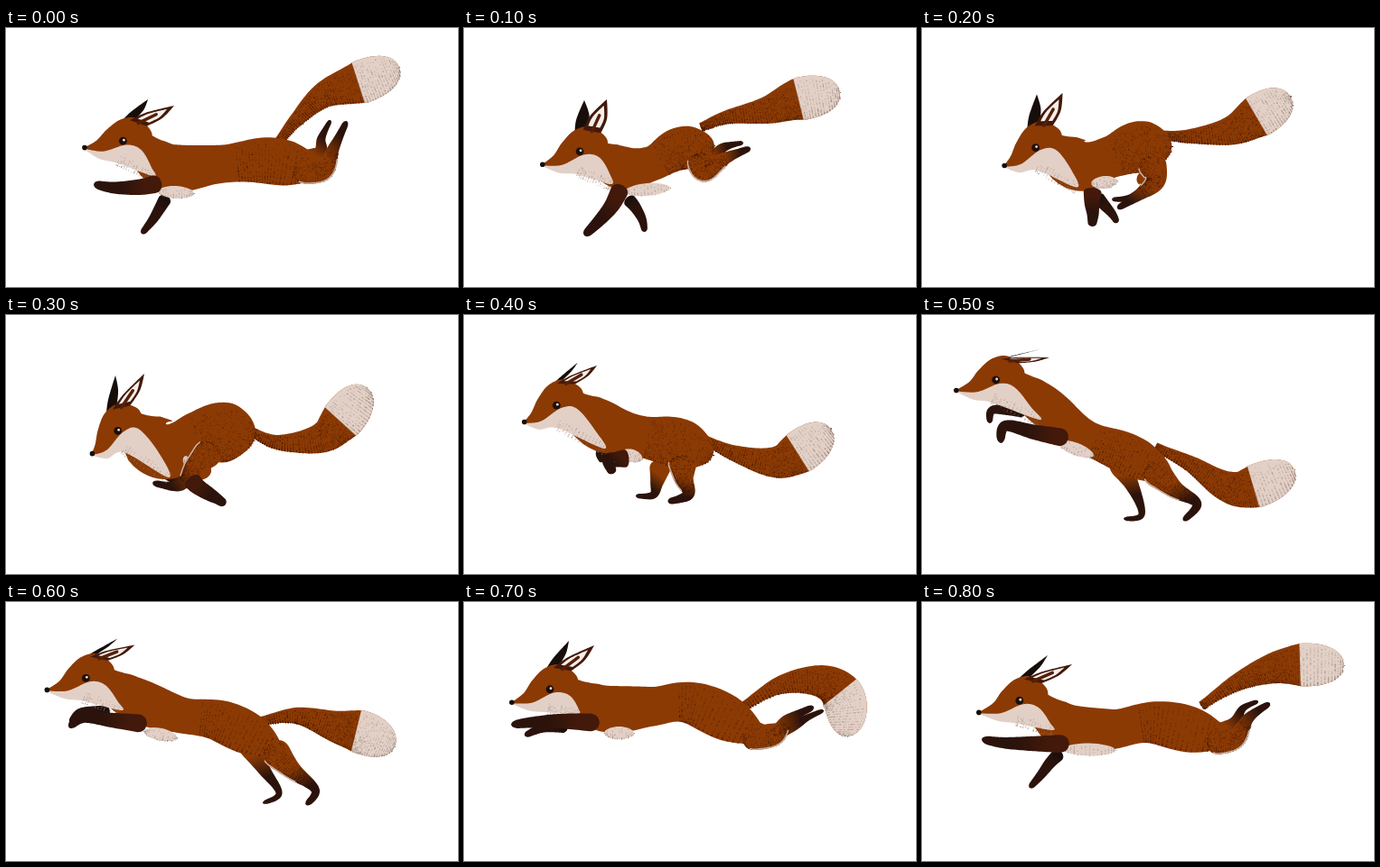
An HTML page with a canvas for the animation above (900 ms loop, 500 by 287 pixels).

```html
<!DOCTYPE html>
<html lang="en">
<head>
<meta charset="utf-8">
<title>Running fox</title>
<style>
html, body { margin: 0; width: 100%; height: 100%; overflow: hidden; background: #fff; }
canvas { display: block; width: 500px; height: 287px; }
</style>
</head>
<body>
<canvas id="stage" width="500" height="287"></canvas>
<script>
const W = 500, H = 287, STEP = 100;
const RUST = '#8b3a04', BROWN = '#42190a', DARK = '#2b130c', BLACK = '#170e0b';
const CREAM = '#e2d0c6', SOOT = '#3a1408', DUST = '#8d7a74';

// A pose is a skeleton of "x,y" joints. head: skull, nose, end of the bib; ears: far and near tip.
const stretched = {
  head: '140,122 85,133 163,164', ears: '157,79 186,86', girth: 25,
  spine: '143,126 180,154 235,151 290,147 350,158', belly: '168,181 208,183',
  tail: '300,128 321,102 352,74 395,59 435,43',
  nearHind: '318,153 350,158 363,132 377,103', farHind: '325,150 347,138 349,122 359,102',
  nearFront: '172,171 150,176 120,177 97,173', farFront: '178,186 170,200 162,213 150,228'
};
const reach = {
  head: '138,132 85,152 162,173', ears: '133,80 158,79', girth: 23,
  spine: '143,138 175,155 208,150 238,134 277,130', belly: '178,181 228,177',
  tail: '262,110 290,99 335,91 370,79 416,71',
  nearHind: '262,138 266,157 290,144 317,133', farHind: '258,142 276,142 288,132 309,127',
  nearFront: '175,174 164,196 150,213 133,230', farFront: '180,188 189,198 197,212 200,226'
};
const gathered = {
  head: '131,120 94,155 180,180', ears: '121,67 153,65', girth: 32,
  spine: '138,126 178,150 212,135 242,130 276,132', belly: '196,164 204,162',
  tail: '268,127 300,141 346,137 370,118 399,80',
  nearHind: '232,145 208,168 192,189 162,186', farHind: '225,165 195,182 175,178 157,175',
  nearFront: '203,180 212,190 228,200 243,210', farFront: '205,184 215,195 225,202 232,206'
};
const launch = {
  head: '92,68 36,84 130,116', ears: '131,38 141,47', girth: 22,
  spine: '98,72 132,98 180,134 225,153 275,178', belly: '150,141 190,156',
  tail: '258,146 297,165 335,189 364,191 412,171',
  nearHind: '250,165 278,192 304,209 289,228', farHind: '212,158 232,188 243,221 223,226',
  nearFront: '162,137 125,130 92,123 87,142', farFront: '115,107 95,105 77,106 75,120'
};
const glide = {
  head: '105,92 51,112 125,124', ears: '116,43 144,48', girth: 25,
  spine: '112,98 155,118 205,116 255,113 330,150', belly: '155,145 188,145',
  tail: '306,118 350,92 395,88 420,107 424,149',
  nearHind: '308,146 342,149 358,131 387,116', farHind: '325,150 362,138 380,128 398,120',
  nearFront: '150,134 110,132 80,133 52,136', farFront: '115,138 100,138 85,140 67,148'
};
const float = {
  head: '118,105 61,123 144,142', ears: '139,59 166,69', girth: 25,
  spine: '124,112 162,139 210,141 260,134 340,153', belly: '156,163 214,164',
  tail: '309,115 345,91 380,76 412,70 467,70',
  nearHind: '315,151 345,152 362,128 385,112', farHind: '322,150 345,135 355,118 372,110',
  nearFront: '163,157 125,157 90,156 66,152', farFront: '154,166 142,178 132,191 119,206'
};

const add = (a, b, k = 1) => ({ x: a.x + b.x * k, y: a.y + b.y * k });
const mix = (a, b, k) => ({ x: a.x + (b.x - a.x) * k, y: a.y + (b.y - a.y) * k });
const dist = (a, b) => Math.hypot(a.x - b.x, a.y - b.y);
const sharp = p => ({ ...p, sharp: true });
const parse = text => text.split(' ').map(pair => {
  const [x, y] = pair.split(',').map(Number);
  return { x, y };
});
const mapPose = (pose, read) => Object.fromEntries(Object.keys(pose).map(key => [key, read(key)]));
const skeleton = pose => mapPose(pose, key => key === 'girth' ? pose.girth : parse(pose[key]));

function between(a, b, changes = {}) {
  const from = skeleton(a), to = skeleton(b);
  const middle = mapPose(from, key => key === 'girth'
    ? (from.girth + to.girth) / 2
    : from[key].map((p, i) => mix(p, to[key][i], .5)));
  return { ...middle, ...skeleton(changes) };
}

const poses = [
  skeleton(stretched),
  skeleton(reach),
  between(reach, gathered, {
    nearHind: '250,142 258,168 240,185 216,200', farHind: '245,158 250,176 232,188 210,190'
  }),
  skeleton(gathered),
  between(gathered, launch),
  skeleton(launch),
  between(launch, glide, {
    nearHind: '290,158 315,185 342,208 332,225', farHind: '262,150 285,185 302,212 284,223',
    tail: '282,132 322,126 365,138 395,145 430,160'
  }),
  skeleton(glide),
  skeleton(float)
];

// Cardinal spline through the points; sharp points stay corners.
function spline(p, closed) {
  const n = p.length, out = [];
  const at = i => closed ? p[(i + n) % n] : p[Math.max(0, Math.min(n - 1, i))];
  const slope = (i, axis) => at(i).sharp ? 0 : (at(i + 1)[axis] - at(i - 1)[axis]) / 2;
  for (let i = 0; i < (closed ? n : n - 1); i++) {
    for (let t = 0; t < 1; t += 1 / 16) {
      const t2 = t * t, t3 = t2 * t;
      const hermite = axis =>
        at(i)[axis] * (2 * t3 - 3 * t2 + 1) + slope(i, axis) * (t3 - 2 * t2 + t) +
        at(i + 1)[axis] * (3 * t2 - 2 * t3) + slope(i + 1, axis) * (t3 - t2);
      out.push({ x: hermite('x'), y: hermite('y') });
    }
  }
  if (!closed) out.push(p[n - 1]);
  return out;
}

// A curved band: centre points with a normal and a radius that depends on the way along it.
function ribbon(joints, radius) {
  const line = spline(joints, false), far = [0];
  line.slice(1).forEach((p, i) => far.push(far[i] + dist(p, line[i])));
  return line.map((p, i) => {
    const a = line[Math.max(0, i - 1)], b = line[Math.min(line.length - 1, i + 1)];
    const size = dist(a, b) || 1, t = far[i] / far[far.length - 1];
    return { x: p.x, y: p.y, t, r: radius(t), normal: { x: (a.y - b.y) / size, y: (b.x - a.x) / size } };
  });
}
const edge = (band, side) => band.map(p => add(p, p.normal, p.r * side));
const outline = band => [...edge(band, 1), ...edge(band, -1).reverse()];
const cap = (t, start, power = 2) => t < start ? 1 : Math.pow(Math.max(0, 1 - ((t - start) / (1 - start)) ** power), 1 / 2);

const tailRadius = t => t < .72 ? 5 + 19 * (t / .72) ** 1.5 : 24 * cap(t, .72, 2.6);
const torsoRadius = girth => t =>
  girth * (.94 - .1 * Math.cos(4 * Math.PI * t)) * Math.min(1, .75 + 2 * t) * cap(t, .8);
const hindRadius = t => (3.5 + 17 * (1 - t) ** 1.7) * cap(t, .93) * cap(1 - t, .8);
const frontRadius = t => (4 + 6.5 * (1 - t) ** .8) * cap(t, .92) * cap(1 - t, .88);
const slim = radius => t => radius(t) * .72;

function seeded(seed) {
  return () => {
    seed = (seed + 0x6D2B79F5) | 0;
    let t = Math.imul(seed ^ seed >>> 15, 1 | seed);
    t = t + Math.imul(t ^ t >>> 7, 61 | t) ^ t;
    return ((t ^ t >>> 14) >>> 0) / 4294967296;
  };
}

function paint(pose, index) {
  const canvas = document.createElement('canvas');
  canvas.width = W;
  canvas.height = H;
  const g = canvas.getContext('2d'), random = seeded(index + 7);
  g.lineCap = g.lineJoin = 'round';

  const trace = points => {
    g.beginPath();
    points.forEach(p => g.lineTo(p.x, p.y));
  };
  const fill = (points, colour) => {
    trace(points);
    g.fillStyle = colour;
    g.fill();
  };
  const stroke = (points, colour, width) => {
    trace(points);
    g.strokeStyle = colour;
    g.lineWidth = width;
    g.stroke();
  };
  const dot = (p, r, colour) => {
    g.beginPath();
    g.arc(p.x, p.y, r, 0, 7);
    g.fillStyle = colour;
    g.fill();
  };
  // Speckles thicken towards the lower edge of a band.
  const grain = (band, colour, count) => {
    g.fillStyle = colour;
    g.globalAlpha = .42;
    for (let i = 0; i < count; i++) {
      const p = band[Math.floor(random() * band.length)];
      const spot = add(p, p.normal, p.r * (.95 - 1.8 * random() ** 1.8));
      g.fillRect(spot.x, spot.y, 1, 1);
    }
    g.globalAlpha = 1;
  };
  const limb = (joints, radius, top, bend) => {
    const band = ribbon(joints, radius), [hip, , , foot] = joints;
    const shade = g.createLinearGradient(hip.x, hip.y, foot.x, foot.y);
    shade.addColorStop(bend, top);
    shade.addColorStop(bend + .35, DARK);
    fill(outline(band), shade);
    return band;
  };

  // Head space: forward runs from skull to nose, down is square to it.
  const [skull, nose, bibEnd] = pose.head, reach = dist(skull, nose);
  const ahead = { x: (nose.x - skull.x) / reach, y: (nose.y - skull.y) / reach };
  const below = { x: ahead.y, y: -ahead.x };
  const onHead = (forward, down) => add(add(skull, ahead, forward), below, down);

  const ear = (front, back, tip) => {
    const middle = mix(front, back, .5);
    const side = base => add(mix(base, tip, .45), { x: base.x - middle.x, y: base.y - middle.y }, .4);
    return spline([sharp(front), side(front), sharp(tip), side(back), sharp(back)], true);
  };
  const [farTip, nearTip] = pose.ears;
  const earFront = onHead(-1, -20), earBack = onHead(-18, -10);
  const nearEar = ear(earFront, earBack, nearTip);
  const earRoot = mix(earFront, earBack, .5), earHeart = mix(earRoot, nearTip, .42);

  const tail = ribbon(pose.tail, tailRadius);
  const tip = tail.filter(p => p.t > .7);
  const torso = ribbon(pose.spine, torsoRadius(pose.girth));
  const belly = ribbon(pose.belly, t => 7 * Math.sqrt(Math.sin(Math.PI * t)));

  limb(pose.farHind, slim(hindRadius), RUST, .3);
  limb(pose.farFront, slim(frontRadius), BLACK, 0);
  fill(outline(tail), RUST);
  grain(tail.filter(p => p.t < .7), SOOT, 900);
  fill(outline(tip), CREAM);
  grain(tip, DUST, 450);

  fill(ear(onHead(9, -20), onHead(-7, -20), farTip), BLACK);
  fill(outline(torso), RUST);
  grain(torso.filter(p => p.t > .55), SOOT, 500);
  fill(outline(belly), CREAM);
  grain(belly, DUST, 90);

  const thigh = limb(pose.nearHind, hindRadius, RUST, .45);
  grain(thigh.filter(p => p.t < .6), SOOT, 400);
  stroke(edge(thigh, .95).filter((p, i) => thigh[i].t > .1 && thigh[i].t < .55), '#c9b3a6', 1.5);

  fill(spline([sharp(nose), onHead(40, -5), onHead(26, -15), onHead(8, -23),
    onHead(-10, -20), onHead(-22, 0), onHead(-8, 18), onHead(22, 20)], true), RUST);
  fill(spline([sharp(nose), onHead(35, 8), onHead(8, 6), onHead(-7, 15),
    mix(onHead(-14, 28), bibEnd, .45), bibEnd, onHead(22, 24), onHead(41, 15)], true), CREAM);
  grain(ribbon([onHead(20, 20), bibEnd], () => 7), DUST, 130);
  limb(pose.nearFront, frontRadius, BROWN, .25);

  fill(nearEar, BROWN);
  fill(nearEar.map(p => mix(earHeart, p, .66)), '#f5eeea');
  stroke([earRoot, mix(earRoot, nearTip, .5)], '#552009', 3.5);
  dot(onHead(11, 1), 4.4, '#1d0f0a');
  dot(add(onHead(11, 1), { x: 1, y: -1 }), 1.4, '#e9dfd8');
  dot(add(nose, ahead, -2), 2.8, BLACK);
  return canvas;
}

const cels = poses.map(paint);
const stage = document.getElementById('stage').getContext('2d');
const began = performance.now();

function show() {
  const time = Math.max(0, performance.now() - began);
  stage.clearRect(0, 0, W, H);
  stage.drawImage(cels[Math.floor(time / STEP) % cels.length], 0, 0);
  requestAnimationFrame(show);
}
show();
</script>
</body>
</html>
```
